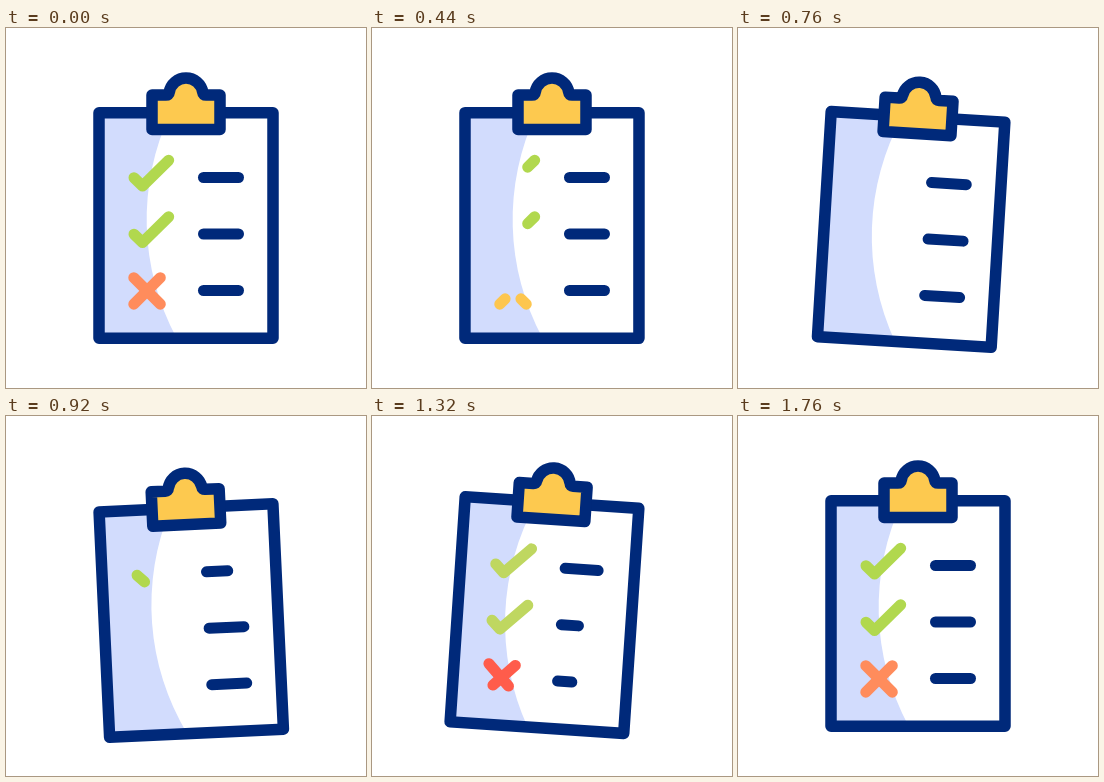
Animation of 360 by 360 pixels, one loop 2000 ms. Source, as an HTML page:

```html
<!DOCTYPE html>
<html lang="en">
<head>
<meta charset="utf-8">
<title>Checklist</title>
<style>
  html, body { margin: 0; width: 100%; height: 100%; overflow: hidden; background: #fff; }
  svg { display: block; width: 100vw; height: 100vh; }
</style>
</head>
<body>
<svg viewBox="0 0 360 360" fill="none" stroke-width="11" stroke-linecap="round" stroke-linejoin="round">
  <g id="board">
    <path fill="#d2dcfd" d="M93 85H164.5A250 250 0 0 0 170.5 310H93Z"/>
    <rect x="93" y="84.7" width="174" height="225.6" stroke="#00297a" stroke-width="11.5"/>
    <path fill="#fdc94f" stroke="#00297a" stroke-width="11.5"
      d="M146 67H160Q163 67 163.2 64.5A17 17 0 0 1 196.8 64.5Q197 67 200 67H214V101.5H146Z"/>
    <g id="marks"></g>
  </g>
</svg>
<script>
const LOOP = 2000, STEP = 40, ROW = 56.5;
const board = document.getElementById('board');
const marks = document.getElementById('marks');

const clamp = x => Math.min(1, Math.max(0, x));
const ease = (t, a, b) => (1 - Math.cos(Math.PI * clamp((t - a) / (b - a)))) / 2;
const bump = (t, mid, half) => ease(Math.abs(t - mid), half, 0);

function addPath(stroke) {
  const el = document.createElementNS('http://www.w3.org/2000/svg', 'path');
  el.setAttribute('stroke', stroke);
  return marks.appendChild(el);
}

// Part of a polyline between the fractions a and b of its length
function trim(pts, a, b) {
  if (b <= a) return '';
  const lens = pts.slice(1).map((p, i) => Math.hypot(p[0] - pts[i][0], p[1] - pts[i][1]));
  const total = lens.reduce((s, l) => s + l, 0);
  const from = a * total, to = b * total, out = [];
  let pos = 0;
  lens.forEach((len, i) => {
    const lo = Math.max(from, pos), hi = Math.min(to, pos + len);
    if (lo < hi) {
      const at = d => pts[i].map((v, k) => (v + (pts[i + 1][k] - v) * (d - pos) / len).toFixed(2)).join(' ');
      if (!out.length) out.push(at(lo));
      out.push(at(hi));
    }
    pos += len;
  });
  return out.length ? 'M' + out.join('L') : '';
}

const check = y => [[128, 149.7 + y], [136.5, 158 + y], [162.7, 132.3 + y]];
const strokes = [
  { pts: check(0), start: 830 },
  { pts: check(ROW), start: 970 },
  { pts: [[127.8, 249.7], [154.3, 276.2]], start: 1110, cross: true },
  { pts: [[154.3, 249.7], [127.8, 276.2]], start: 1110, cross: true }
];
strokes.forEach(s => s.el = addPath('#b1d84e'));

const dashes = [1060, 1220, 1385].map((mid, i) => ({ mid, y: 149.5 + i * ROW, el: addPath('#00297a') }));

const swing = [[430, 0], [720, 3.9], [990, -3.9], [1340, 3.9], [1640, 0]];
function angle(t) {
  return swing.slice(1).reduce((sum, [at, deg], i) =>
    sum + (deg - swing[i][1]) * ease(t, swing[i][0], at), 0);
}

function crossColor(t) {
  if (t >= 280 && t < 600) return '#fdc64f';
  return t >= 600 && t < 1600 ? '#ff5c4b' : '#ff8c5c';
}
const checkColor = t => t >= 1300 && t < 1600 ? '#bfd760' : '#b1d84e';

function draw(t) {
  const drop = 7.6 * bump(t, 990, 490);
  board.setAttribute('transform', `translate(0 ${drop.toFixed(3)}) rotate(${angle(t).toFixed(3)} 180 85)`);
  for (const s of strokes) {
    const d = t < 640
      ? trim(s.pts, ease(t, 250, 520), 1)
      : trim(s.pts, 0, ease(t, s.start, s.start + 300));
    s.el.setAttribute('d', d);
    s.el.setAttribute('stroke', s.cross ? crossColor(t) : checkColor(t));
  }
  for (const d of dashes) {
    const len = 35 - 23 * bump(t, d.mid, 320);
    d.el.setAttribute('d', `M197.5 ${d.y}h${len.toFixed(2)}`);
  }
}

const begin = performance.now();
function tick() {
  const t = (performance.now() - begin) % LOOP;
  draw(Math.floor(t / STEP) * STEP);
  requestAnimationFrame(tick);
}
draw(0);
requestAnimationFrame(tick);
</script>
</body>
</html>
```
